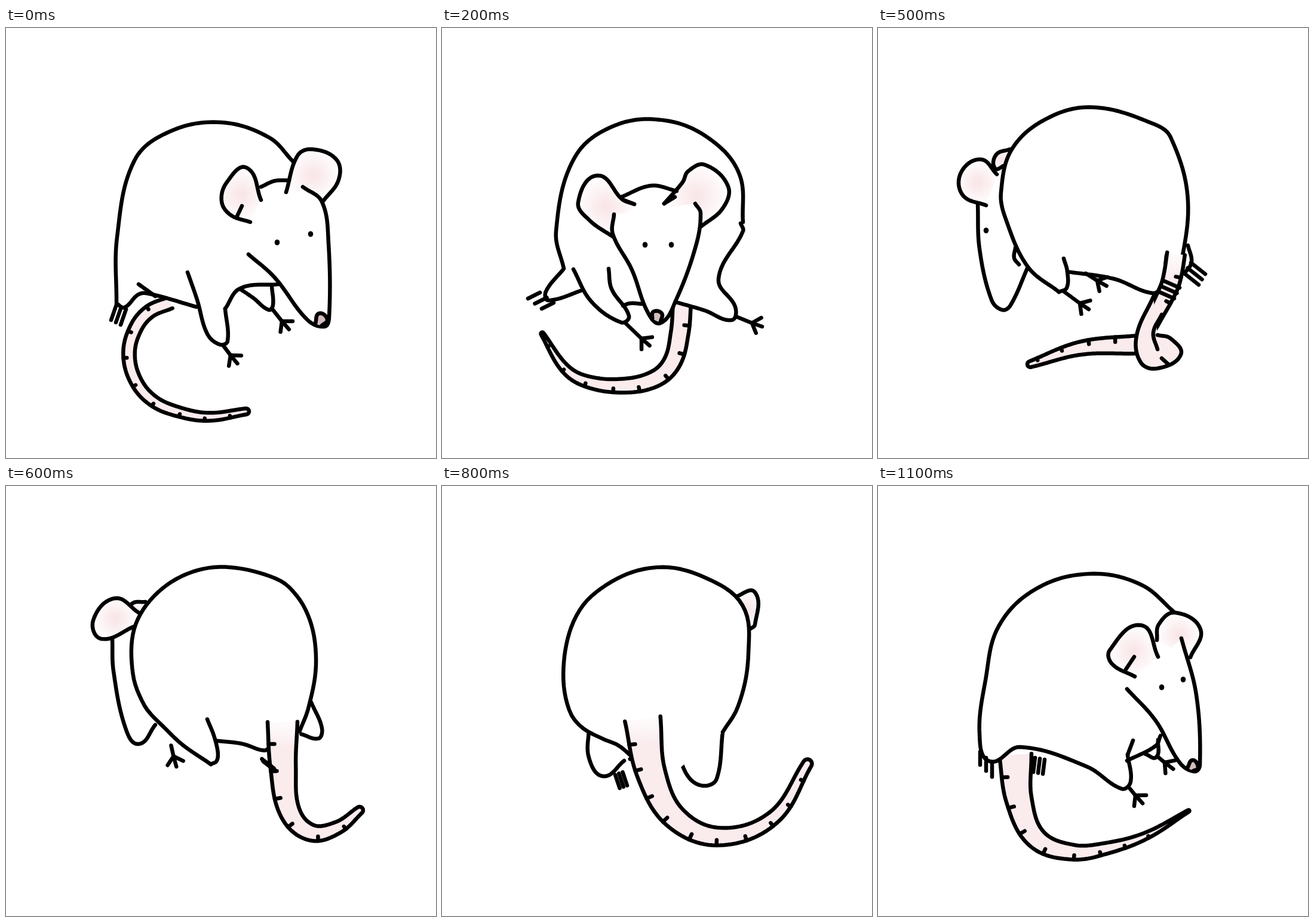
An HTML page with a canvas for the animation above (1.2 s loop, 720 by 720 pixels).

```html
<!DOCTYPE html>
<html lang="en">
<head>
<meta charset="utf-8">
<title>Turning rat</title>
<style>
html, body { margin: 0; width: 100%; height: 100%; overflow: hidden; background: #fff; }
canvas { display: block; width: 100vmin; height: 100vmin; }
</style>
</head>
<body>
<canvas id="stage" width="720" height="720"></canvas>
<script>
const ctx = document.getElementById('stage').getContext('2d');
const STEP = 100;
const PINK = '#faebed';
const kindOf = key => key.replace(/[A-Z]$/, '');
const dist = (a, b) => Math.hypot(b[0] - a[0], b[1] - a[1]);
const mid = (a, b) => a.map((v, i) => (v + b[i]) / 2);

// "x y x y!": a "!" makes the point a sharp corner.
function points(text) {
  const t = text.split(' '), out = [];
  for (let i = 0; i < t.length; i += 2) {
    const p = [+t[i], parseFloat(t[i + 1])];
    out.push(p);
    if (t[i + 1].endsWith('!')) out.push(p);
  }
  return out;
}

// Smooth curve through the points, as a fine polyline.
function smooth(p) {
  const dir = p.map((_, i) => {
    const a = p[Math.max(i - 1, 0)], b = p[Math.min(i + 1, p.length - 1)];
    const d = dist(a, b) || 1;
    return [(b[0] - a[0]) / d, (b[1] - a[1]) / d];
  });
  const out = [p[0]];
  for (let i = 1; i < p.length; i++) {
    const a = p[i - 1], b = p[i], u = dir[i - 1], v = dir[i], k = dist(a, b) * 0.36;
    if (!k) continue;
    for (let s = 1; s <= 14; s++) {
      const t = s / 14, r = 1 - t;
      out.push([0, 1].map(c => r * r * r * a[c] + 3 * r * r * t * (a[c] + u[c] * k) +
        3 * r * t * t * (b[c] - v[c] * k) + t * t * t * b[c]));
    }
  }
  return out;
}

// The same curve as n + 1 points at equal distances.
function even(p, n) {
  const sum = [0];
  for (let i = 1; i < p.length; i++) sum.push(sum[i - 1] + dist(p[i - 1], p[i]));
  const out = [];
  for (let s = 0, i = 1; s <= n; s++) {
    const want = sum[p.length - 1] * s / n;
    while (i < p.length - 1 && sum[i] < want) i++;
    const t = (want - sum[i - 1]) / (sum[i] - sum[i - 1] || 1);
    out.push([0, 1].map(c => p[i - 1][c] + (p[i][c] - p[i - 1][c]) * t));
  }
  return out;
}

function part(key, data) {
  const [text, ...w] = [].concat(data);
  const raw = /paws|claws|eyes/.test(key);
  return { w, segs: text.split('/').map(s => raw ? points(s) : smooth(points(s))) };
}

const pose = data => Object.fromEntries(Object.entries(data).map(([k, d]) => [k, part(k, d)]));

function blend(a, b, key) {
  const raw = /paws|claws|eyes/.test(key);
  const n = Math.min(a.segs.length, b.segs.length);
  const segs = a.segs.slice(0, n).map((s, i) => {
    const p = raw ? s : even(s, 90), q = raw ? b.segs[i] : even(b.segs[i], 90);
    return p.map((v, j) => mid(v, q[j]));
  });
  return { segs, w: mid(a.w, b.w) };
}

// Halfway pose; the extra parts replace or add, new ones lie behind.
function between(a, b, extra) {
  const more = pose(extra), out = {};
  for (const k in more) if (!a[k]) out[k] = more[k];
  for (const k in a) {
    if (more[k]) out[k] = more[k];
    else if (b[k]) out[k] = blend(a[k], b[k], k);
  }
  return out;
}

function path(p, fill) {
  ctx.beginPath();
  p.forEach(q => ctx.lineTo(q[0], q[1]));
  if (fill) { ctx.fillStyle = fill; ctx.fill(); }
  ctx.stroke();
}

function glow(p) {
  const xs = p.map(q => q[0]), ys = p.map(q => q[1]);
  const x0 = Math.min(...xs), x1 = Math.max(...xs), y0 = Math.min(...ys), y1 = Math.max(...ys);
  const x = (x0 + x1) / 2, y = (y0 + y1) / 2;
  const g = ctx.createRadialGradient(x, y, 4, x, y, Math.max(x1 - x0, y1 - y0) / 2);
  g.addColorStop(0, '#f9e6e8');
  g.addColorStop(1, '#fff');
  return g;
}

function fade(y) {
  const g = ctx.createLinearGradient(0, y - 10, 0, y + 45);
  g.addColorStop(0, '#fff');
  g.addColorStop(1, PINK);
  return g;
}

// Tapered tube along a centre line, with ticks on its outer side.
function tube({ segs, w }, fill) {
  const c = even(segs[0], 80), left = [], right = [];
  let area = 0, length = 0, next = 36;
  const ticks = [];
  c.forEach((p, i) => { const q = c[(i + 1) % c.length]; area += p[0] * q[1] - p[1] * q[0]; });
  c.forEach((p, i) => {
    const t = i / 80, a = c[Math.max(i - 1, 0)], b = c[Math.min(i + 1, 80)], d = dist(a, b);
    const r = (w[0] * (1 - t) * (1 - 2 * t) + w[1] * 4 * t * (1 - t) + w[2] * t * (2 * t - 1)) / 2;
    const n = [(a[1] - b[1]) / d, (b[0] - a[0]) / d];
    const at = k => [p[0] + n[0] * k, p[1] + n[1] * k];
    left.push(at(-r));
    right.unshift(at(r));
    if (i) length += dist(c[i - 1], p);
    if (length > next && i < 77) {
      const s = area > 0 ? -1 : 1;
      ticks.push([at(s * r), at(s * (r - Math.min(10, r * 0.6)))]);
      next += 44;
    }
  });
  const end = c[80], tip = w[2] / 2, a0 = Math.atan2(left[80][1] - end[1], left[80][0] - end[0]);
  const cap = Array.from({ length: 9 }, (_, i) => a0 + Math.PI * i / 8)
    .map(a => [end[0] + Math.cos(a) * tip, end[1] + Math.sin(a) * tip]);
  path([...left, ...cap, ...right], fill);
  ticks.forEach(s => path(s));
}

function paw([a, b]) {
  const turn = Math.atan2(b[1] - a[1], b[0] - a[0]);
  path([a, b]);
  for (const d of [-0.9, -0.05, 0.8])
    path([b, [b[0] + 18 * Math.cos(turn + d), b[1] + 18 * Math.sin(turn + d)]]);
}

function claw([a, b, d]) {
  for (const p of [a, mid(a, b), b]) path([p, [p[0] + d[0], p[1] + d[1]]]);
}

function eye([[x, y]]) {
  ctx.beginPath();
  ctx.ellipse(x, y, 4.3, 4.8, 0, 0, 7);
  ctx.fillStyle = '#000';
  ctx.fill();
}

const each = f => o => o.segs.forEach(f);
const skin = each(s => path(s, '#fff'));
const draw = {
  body: skin, head: skin, leg: skin, foot: skin,
  line: each(s => path(s)),
  ear: each(s => path(s, glow(s))),
  nose: each(s => path(s, '#d3bcbc')),
  knot: each(s => path(s, PINK)),
  paws: each(paw), claws: each(claw), eyes: each(eye),
  tail: o => tube(o, PINK),
  rump: o => tube(o, fade(o.segs[0][0][1]))
};

const right = pose({
  tail: ['275 460 240 475 217 503 206 545 217 590 246 624 290 643 340 651 402 642', 20, 18, 10],
  body: '319 467 240 445 222 446 198 468 185 461! 186 350 215 222 275 173 360 158 440 183 481 224',
  line: '222 429 250 449',
  claws: '185 463 201 471 -9 26',
  footB: '392 437 414 452 440 472 447 464 445 432',
  leg: '304 409 320 455 337 512 358 530 371 524 367 470',
  lineC: '367 470 392 436 456 429',
  paws: '364 532 376 548/447 472 462 491',
  earB: '469 275 488 214 512 203 553 220 557 254 531 290',
  head: '406 379 450 418 504 488 533 500 541 485 540 360 529 291 497 266',
  lineT: '427 266 450 256 474 255',
  ear: '427 288 403 234 370 258 361 290 376 313 409 325',
  lineB: '387 315 395 298',
  nose: '518 495 524 478 538 488 528 499',
  eyes: '454 359/510 345'
});

const front = pose({
  tail: ['402 460 398 510 385 560 355 588 300 599 240 591 205 569 168 512', 30, 24, 5],
  body: '238 438 178 456 174 441 204 403! 191 340 222 217 290 163 375 155 450 187 498 245 504 325',
  footF: '500 327 504 340 463 420 491 467 485 489 440 473 392 459',
  claws: '164 443 187 460 -20 10',
  leg: '220 404 250 458 300 493 313 482 284 437 279 403',
  lineC: '303 465 315 461 335 462',
  paws: '307 494 334 520/492 483 519 494',
  earB: '372 294 403 258 412 240 440 229 479 265 470 302 433 333',
  ear: '322 295 302 287 260 247 228 292 247 322 287 350',
  head: '288 312 286 345 318 405 345 477 366 494 392 455 425 365 433 310 424 294',
  lineT: '300 283 350 264 393 273',
  lineE: '322 295 302 287/372 294 390 283',
  nose: '352 488 354 475 368 478 366 492',
  eyes: '340 363/384 363'
});

const left = pose({
  tail: ['443 422 441 480 430 525 398 572 350 585 300 571 252 526', 36, 29, 10],
  foot: '520 372 518 418 495 432 465 427',
  body: '217 262 245 208 300 163 370 152 450 175 505 230 528 305 517 385 500 422 460 425 415 416',
  claws: '517 407 499 433 9 13',
  leg: '408 405 438 462 420 473 385 452 328 425',
  paws: '297 474 314 491/440 472 469 478',
  ear: '256 275 230 260 205 285 218 326',
  head: '336 374 318 435 280 494 255 506 240 488 214 390 220 320 250 276 308 268',
  earB: '282 313 306 282 318 243 352 247 377 298 360 326 331 341',
  lineB: '344 328 337 304',
  nose: '247 499 250 488 261 493 257 504',
  eyes: '247 360/291 358'
});

const leftBack = pose({
  ear: '221 203 198 212 196 235 212 230',
  head: '251 400 222 464 208 472 190 455 170 370 167 294',
  earB: '181 297 142 280 139 242 172 220 199 245',
  eyes: '181 339',
  line: '230 368 228 385 236 396',
  foot: '519 364 525 392 514 410',
  body: '303 442 251 400 214 320 206 275 226 200 290 148 365 133 460 160 490 183 519 290 503 425',
  lineL: '303 442 316 435 317 408 311 386',
  lineV: '317 408 395 420 460 444 476 430 483 381',
  claws: '524 393 513 411 24 19',
  tail: ['434 530 340 536 255 563', 30, 22, 10],
  rump: ['499 378 494 410 487 435 462 485 452 505', 30, 28, 22],
  knot: '461 450 433 515 440 560 468 570 507 547 490 520 468 514',
  lineK: '475 480 461 510 468 538/475 553 485 562',
  clawsB: '480 424 471 442 25 11',
  paws: '311 441 338 461/348 411 367 423'
});

const back = pose({
  ear: '246 185 222 184 202 215 217 236',
  footC: '243 403 240 428 268 424',
  foot: '503 360 533 425 522 450 475 421',
  paws: '242 428 223 444',
  body: '383 490 300 437 243 402 206 290 228 208 290 152 360 133 440 148 497 190 519 275 503 360 480 397',
  lineL: '383 490 394 482 386 445 363 395',
  lineV: '386 445 413 440',
  clawsB: '377 490 391 481 15 20',
  rump: ['441 412 451 475 470 550 500 585 530 597 565 575 572 520 555 455 531 418', 58, 34, 16],
  lineR: '484 342 472 405'
});

const rightBack = pose({
  earB: '495 193 528 173 547 200 543 250 527 257',
  footL: '196 365 195 455 215 475 222 470',
  head: '476 410 498 437 510 425 524 350 526 280 512 215',
  paws: '458 428 442 464',
  body: '345 512 295 435 262 421 200 380 213 255 255 184 365 139 455 165 512 215 508 290 490 375 460 427',
  lineH: '460 427 385 446 368 455! 370 500 345 512',
  line: '499 355 500 385 493 394',
  claws: '337 512 370 502 17 26',
  clawsB: '203 477 214 477 0 25',
  rump: ['230 362 238 440 262 510 315 565 385 595 465 578 525 530 545 465', 62, 29, 15]
});

const rightTurn = pose({
  tail: ['230 450 236 525 265 590 325 613 385 606 450 585 520 544', 54, 25, 3],
  footB: '448 449 466 454 469 425',
  body: '418 450 423 495 408 507 350 470 238 437 187 461 170 415 180 325 202 235 265 172 355 147 440 165 498 213',
  lineL: '418 450 427 426',
  lineT: '417 460 465 435 473 418',
  claws: '263 455 279 458 -3 24',
  clawsB: '171 445 191 465 0 22',
  paws: '422 507 431 518/468 453 480 463',
  earB: '467 258 470 232 497 212 540 240 523 287',
  head: '417 340 465 393 505 463 530 478 539 467 533 350 508 255',
  ear: '469 286 440 233 388 275 392 298 430 319',
  lineB: '415 307 429 286',
  nose: '518 472 527 459 536 472 528 477',
  eyes: '475 337/511 324'
});

const poses = [
  right,
  between(right, front, {
    tail: ['334 460 308 540 306 620 335 698', 30, 32, 12],
    footF: '500 290 490 390 472 425 482 475 440 470'
  }),
  front,
  left,
  between(left, leftBack, { tail: ['470 428 455 510 415 563 340 571 250 545', 33, 26, 8] }),
  leftBack,
  between(leftBack, back, {
    head: '250 400 222 432 200 405 180 310 178 256',
    earB: '215 235 160 256 146 225 182 188 222 212',
    rump: ['463 395 464 470 475 545 510 580 555 572 592 543', 50, 34, 12]
  }),
  back,
  between(back, rightBack, {
    footL: '246 405 246 455 270 486 305 460',
    footH: '470 412 460 490 440 502 415 490 395 450',
    earB: '490 186 524 178 524 232 515 240',
    rump: ['336 390 350 480 390 555 465 587 555 555 612 465', 60, 32, 15]
  }),
  rightBack,
  between(rightTurn, rightBack, {
    tail: ['228 440 238 525 285 588 370 604 460 580 526 515', 56, 27, 10],
    body: '475 405 420 450 375 490 320 480 240 438 195 463 182 430 190 330 215 228 275 166 360 143 435 160 505 210',
    ear: '492 268 492 222 458 230 452 278 482 299',
    eyes: '517 330'
  }),
  rightTurn
];

let shown = -1;
function tick() {
  const i = Math.floor(performance.now() / STEP) % poses.length;
  if (i !== shown) {
    shown = i;
    ctx.fillStyle = '#fff';
    ctx.fillRect(0, 0, 720, 720);
    ctx.strokeStyle = '#000';
    ctx.lineWidth = 6.5;
    ctx.lineCap = ctx.lineJoin = 'round';
    for (const k in poses[i]) draw[kindOf(k)](poses[i][k]);
  }
  requestAnimationFrame(tick);
}
tick();
</script>
</body>
</html>
```
